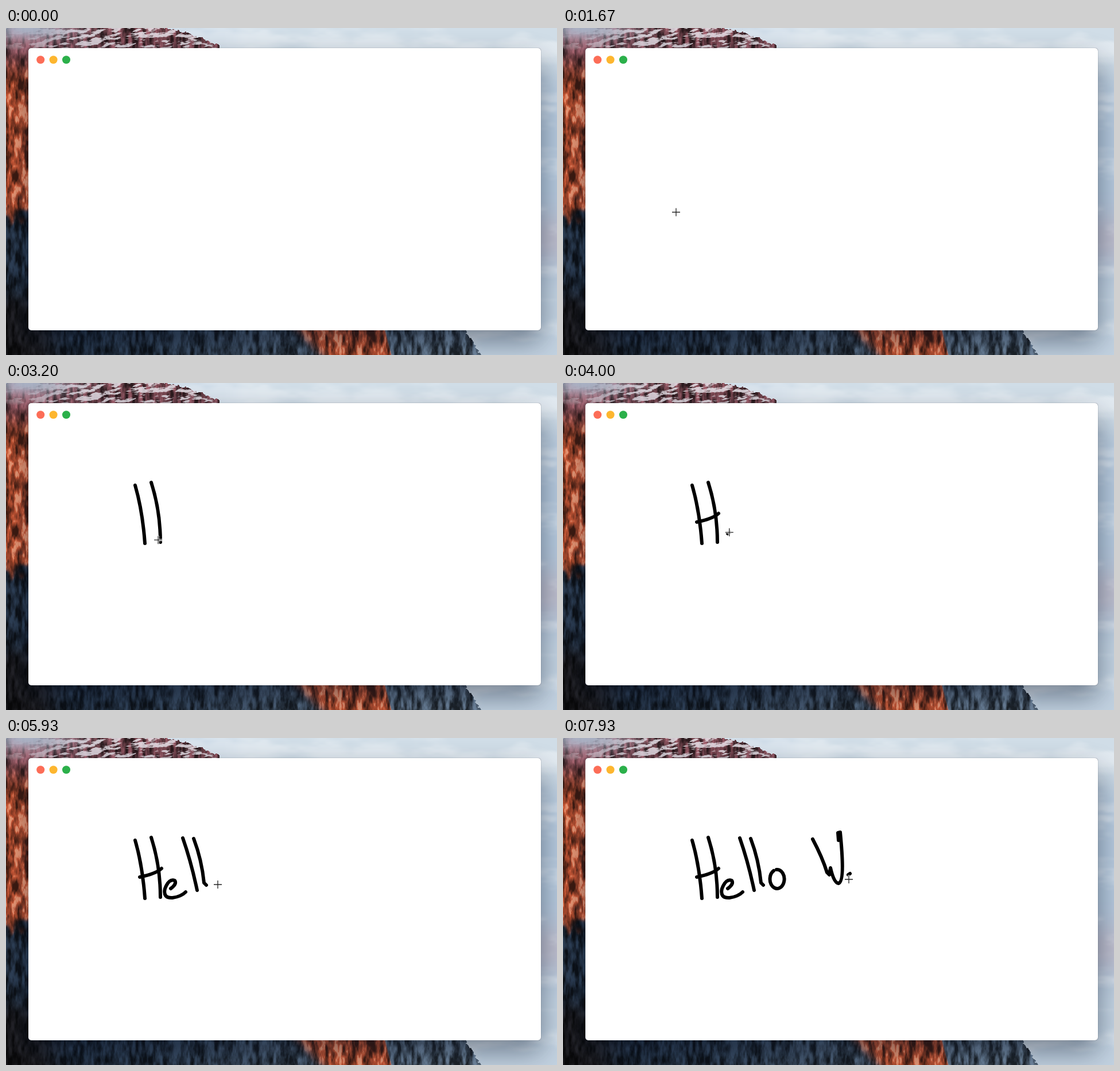
An HTML page with a canvas for the animation above (8 s loop, 960x569 px).

```html
<!DOCTYPE html>
<html lang="en">
<head>
<meta charset="utf-8">
<title>Handwriting</title>
<style>
  html, body { margin: 0; width: 100%; height: 100%; overflow: hidden; background: #c3d0dc; }
  canvas, svg { position: absolute; left: 0; top: 0; }
  .window {
    position: absolute; left: 39px; top: 35px; width: 893px; height: 491px;
    border-radius: 5px; background: #fff;
    box-shadow: 0 0 1px rgba(10, 15, 40, .85), 0 20px 46px rgba(5, 15, 35, .45);
  }
  .ink { fill: none; stroke: #000; stroke-width: 6; stroke-linecap: round; stroke-linejoin: round; }
</style>
</head>
<body>
<canvas id="scene" width="960" height="569"></canvas>
<div class="window"></div>
<svg width="960" height="569">
  <circle cx="60.2" cy="55.2" r="7" fill="#fc6d57"/>
  <circle cx="82.6" cy="55.2" r="7" fill="#fdb62f"/>
  <circle cx="105" cy="55.2" r="7" fill="#2bb04a"/>
  <g class="ink">
    <path d="M225 178Q238 223 242 279" data-from="2130" data-to="2530"/>
    <path d="M253 173Q269 223 269 277" data-from="2730" data-to="3130"/>
    <path d="M233 242Q262 236 271 227" data-from="3470" data-to="3730"/>
    <path d="M287 262Q298 254 294 248Q284 244 277 262Q273 279 290 278Q305 276 313 268" data-from="3930" data-to="4530"/>
    <path d="M308 174Q323 217 333 265" data-from="4870" data-to="5200"/>
    <path d="M327 175Q341 212 345 252L349 256" data-from="5400" data-to="5730"/>
    <path d="M367 231A12.5 16.5 0 1 0 372 229" data-from="6070" data-to="6470"/>
    <path d="M435 176Q452 208 460 234L464 238L466 226Q472 252 480 253C490 250 487 205 483 164L479 165L480 178" data-from="6870" data-to="7600"/>
    <path d="M500 236L497 238" data-from="7860" data-to="7900"/>
  </g>
  <g id="cursor">
    <path d="M-7.5 0H7.5M0-7.5V7.5" stroke="#fff" stroke-width="3.4"/>
    <path d="M-7 0H7M0-7V7" stroke="#222" stroke-width="1.3"/>
  </g>
</svg>
<script>
const clamp = v => Math.max(0, Math.min(1, v));
const ease = u => u * u * (3 - 2 * u);
const rise = (a, b, v) => ease(clamp((v - a) / (b - a)));
const lerp = (a, b, u) => a + (b - a) * u;
const mix = (a, b, u) => a.map((v, i) => lerp(v, b[i], u));
const bump = (v, center, width) => Math.exp(-(((v - center) / width) ** 2));

// ---------- Wallpaper: misty cliff from fractal noise ----------
function hash(x, y) {
  const s = Math.sin(x * 127.1 + y * 311.7) * 43758.5453;
  return s - Math.floor(s);
}

function noise(x, y) {
  const i = Math.floor(x), j = Math.floor(y), u = ease(x - i), v = ease(y - j);
  return lerp(lerp(hash(i, j), hash(i + 1, j), u), lerp(hash(i, j + 1), hash(i + 1, j + 1), u), v);
}

function fractal(x, y) {
  let sum = 0;
  for (let k = 1; k <= 4; k++) sum += noise(x * 2 ** k, y * 2 ** k) / 2 ** k;
  return sum / .9375;
}

const colors = {
  sky: [180, 200, 220], haze: [208, 221, 231], cloud: [238, 243, 247], blush: [192, 184, 198],
  fog: [170, 181, 201], snow: [232, 227, 234], summit: [104, 62, 70],
  sunlit: [152, 66, 40], glint: [230, 172, 140],
  shade: [29, 40, 54], pale: [72, 86, 101], soil: [22, 22, 25]
};

function isRock(x, y) {
  const rough = noise(x / 3, y / 3);
  const ridge = 33 * (Math.max(0, x - 262) / 110) ** 1.5 - 5 * rough;
  const cliffEdge = 798 + (y - 527) * .62 + 6 * rough;
  return y < 300 ? x < 372 && y > ridge : x < cliffEdge;
}

function skyColor(x, y) {
  let c = mix(colors.haze, colors.sky, rise(40, 130, y) * (1 - .5 * rise(400, 470, y)));
  c = mix(c, colors.sky, .7 * (1 - rise(375, 430, x)));
  c = mix(c, colors.blush, .7 * bump(y, 365, 45));
  return mix(c, colors.cloud, .6 * rise(.4, .75, fractal(x / 200, y / 70)));
}

function rockColor(x, y) {
  const grain = clamp((fractal(x / 12, y / 40) - .5) * 2.2 + .5);
  const atFoot = y > 520;
  const drop = y - 527;
  const sun = atFoot
    ? rise(490, 530, x - drop) * (1 - rise(658, 662, x - drop * .25))
    : 1 - rise(300, 340, y + 40 * (noise(x / 9, y / 14) - .5));

  let c = mix(colors.shade, colors.pale, rise(100, 850, x));
  c = mix(c, colors.soil, rise(440, 490, y) * (1 - rise(50, 120, x)));
  c = mix(c, colors.sunlit, sun);
  c = mix(colors.summit, c, rise(35, 100, y));
  c = c.map(v => v * (.4 + 1.2 * grain));
  c = mix(c, colors.glint, .7 * rise(.75, 1, grain) * sun * rise(40, 90, y));

  const drift = rise(.48, .62, fractal((x + y * 1.6) / 26, y / 9));
  c = mix(c, colors.snow, .85 * drift * (1 - rise(31, 40, y)) * rise(-60, 140, x));
  return mix(c, colors.fog, .9 * bump(x, 35, 75) * bump(y, 0, 22));
}

function paintScene() {
  const ctx = document.getElementById('scene').getContext('2d');
  const image = ctx.createImageData(960, 569);
  for (let y = 0, i = 0; y < 569; y++) {
    for (let x = 0; x < 960; x++, i += 4) {
      const covered = x > 45 && x < 926 && y > 40 && y < 520;
      if (covered) continue;
      image.data.set([...(isRock(x, y) ? rockColor : skyColor)(x, y), 255], i);
    }
  }
  ctx.putImageData(image, 0, 0);
}

// ---------- Handwriting ----------
const strokes = [...document.querySelectorAll('.ink path')].map(path => ({
  path, from: +path.dataset.from, to: +path.dataset.to, length: path.getTotalLength()
}));
const cursor = document.getElementById('cursor');

// The cursor visits these places between strokes, and both ends of each stroke.
const keys = [
  { t: 1330, x: 150, y: 527 },
  { t: 1670, x: 197, y: 320.5 },
  { t: 5930, x: 369, y: 255 },
  { t: 6730, x: 453, y: 199 },
  { t: 7930, x: 498, y: 246 }
];
for (const { path, from, to, length } of strokes) {
  const a = path.getPointAtLength(0), b = path.getPointAtLength(length);
  keys.push({ t: from, x: a.x, y: a.y }, { t: to, x: b.x, y: b.y });
}
keys.sort((a, b) => a.t - b.t);

function cursorAt(t) {
  const active = strokes.find(s => t >= s.from && t <= s.to);
  if (active) return active.path.getPointAtLength(active.length * rise(active.from, active.to, t));
  const next = keys.findIndex(k => k.t > t);
  if (next < 1) return keys.at(next);
  const a = keys[next - 1], b = keys[next], u = rise(a.t, b.t, t);
  return { x: lerp(a.x, b.x, u), y: lerp(a.y, b.y, u) };
}

function render(t) {
  for (const { path, from, to, length } of strokes) {
    const shown = Math.max(.01, length * rise(from, to, t));
    path.style.display = t < from ? 'none' : '';
    path.style.strokeDasharray = t < to ? `${shown} ${length + 10}` : 'none';
  }
  const { x, y } = cursorAt(t);
  cursor.style.display = t < keys[0].t ? 'none' : '';
  cursor.setAttribute('transform', `translate(${x.toFixed(1)} ${y.toFixed(1)})`);
}

// The picture advances 15 times a second.
const STEP = 1000 / 15, LOOP = 8000;
let start;
function tick(now) {
  start ??= now;
  const t = (now - start) % LOOP;
  render(Math.round(Math.floor((t + 5) / STEP) * STEP / 10) * 10 % LOOP);
  requestAnimationFrame(tick);
}

paintScene();
render(0);
requestAnimationFrame(tick);
</script>
</body>
</html>
```
